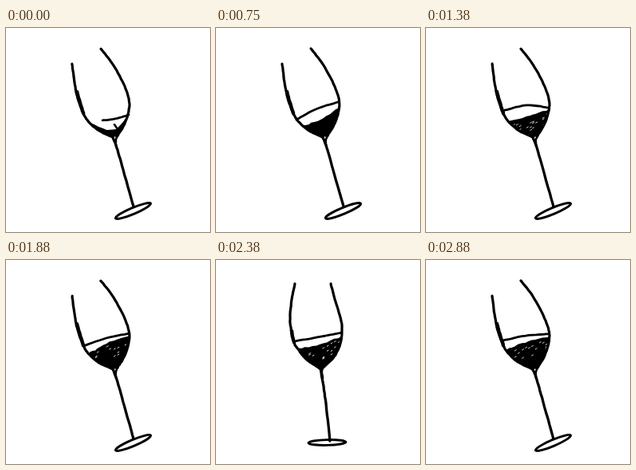
Recreate the animation shown at these times as an HTML page with a canvas. Size 256x256 px, loop 3 s.

```html
<!DOCTYPE html>
<html lang="en">
<head>
<meta charset="utf-8">
<title>Wine glass</title>
<style>
html, body { margin: 0; width: 100%; height: 100%; overflow: hidden; background: #fff; }
canvas { display: block; width: 256px; height: 256px; }
</style>
</head>
<body>
<canvas id="stage" width="256" height="256"></canvas>
<script>
const ctx = document.getElementById('stage').getContext('2d');
const LOOP = 3000;

// Flat lists of x, y pairs; both poses have the same number of points.
const TILTED = {
  left: [83, 45, 86, 68, 90, 88, 98, 109, 105, 119, 117, 129, 134, 137],
  right: [119, 26, 133, 44, 146, 67, 154, 88, 154, 104, 148, 122, 139, 136],
  stem: [134, 137, 139, 150, 147, 178, 160, 224],
  neck: [141, 134, 138, 140, 138, 148],
  shade: [89, 80, 92, 91, 97, 107],
  base: [159.5, 229.5, 24, 3.9, -0.4]
};
const UPRIGHT = {
  left: [99, 30, 95, 50, 93, 77, 98, 103, 103, 112, 114, 125, 130, 136],
  right: [144, 30, 150, 52, 157, 76, 158, 92, 155, 108, 147, 123, 133, 136],
  stem: [131, 136, 134, 153, 138, 181, 143, 227],
  neck: [135, 134, 133, 140, 134, 148],
  shade: [95, 89, 96, 96, 98, 103],
  base: [139.5, 229, 23.5, 3.4, -0.03]
};

// Surface line and top edge of the wine at chosen steps.
const WINE = [
  { at: 0, rim: [121, 116, 137, 114, 154, 109], top: [107, 120, 134, 128, 155, 109] },
  { at: 4, rim: [108, 117, 130, 107, 153, 95], top: [110, 121, 131, 115, 155, 102] },
  { at: 6, rim: [101, 115, 125, 102, 153, 93], top: [108, 123, 131, 115, 155, 99] },
  { at: 11, rim: [96, 104, 126, 97, 153, 100], top: [103, 117, 130, 110, 156, 102] },
  { at: 15, rim: [97, 108, 126, 98, 155, 92], top: [104, 117, 126, 105, 156, 95] },
  { at: 19, rim: [98, 102, 127, 97, 158, 91], top: [102, 111, 130, 106, 159, 95] },
  { at: 23, rim: [97, 101, 125, 95, 153, 93], top: [102, 112, 129, 102, 156, 96] }
];

const mix = (a, b, k) => a.map((v, i) => v + (b[i] - v) * k);

function randomFrom(seed) {
  let s = seed * 7919 + 17;
  return () => {
    s = (s * 16807) % 2147483647;
    return s / 2147483647;
  };
}

// Samples a smooth curve through the points, with a slight hand wobble.
function curve(pts, rnd, wobble = 0.4) {
  const n = pts.length / 2;
  const at = i => {
    const j = 2 * Math.max(0, Math.min(n - 1, i));
    return [pts[j], pts[j + 1]];
  };
  const out = [];
  for (let i = 0; i < n - 1; i++) {
    const [a, b, c, d] = [at(i - 1), at(i), at(i + 1), at(i + 2)];
    const last = i === n - 2 ? 1 : 0;
    for (let s = 0; s < 7 + last; s++) {
      const t = s / 7;
      out.push([0, 1].map(k =>
        b[k] + 0.5 * t * (c[k] - a[k] + t * (2 * a[k] - 5 * b[k] + 4 * c[k] - d[k]
        + t * (3 * (b[k] - c[k]) + d[k] - a[k]))) + (rnd() - 0.5) * wobble));
    }
  }
  return out;
}

function trace(points) {
  ctx.beginPath();
  points.forEach(p => ctx.lineTo(p[0], p[1]));
}

function stroke(points, width) {
  trace(points);
  ctx.lineWidth = width;
  ctx.stroke();
}

function wineAt(step) {
  const i = Math.max(1, WINE.findIndex(w => w.at >= step));
  const a = WINE[i - 1], b = WINE[i];
  const k = (step - a.at) / (b.at - a.at);
  return { rim: mix(a.rim, b.rim, k), top: mix(a.top, b.top, k) };
}

function drawWine(step, left, right, rnd) {
  const { rim, top } = wineAt(step);
  const edge = curve(top, rnd, 1.6);
  ctx.save();
  trace([...left, ...right.slice().reverse()]);
  ctx.clip();
  trace([[top[0] - 8, top[1] + 3], ...edge, [170, top[5]], [165, 140], [100, 140]]);
  ctx.fill();
  if (step > 6) {
    ctx.strokeStyle = '#fff';
    for (let i = 0; i < 16; i++) {
      const p = edge[2 + Math.floor(rnd() * (edge.length - 4))];
      const y = p[1] + 3 + rnd() * 18;
      stroke([[p[0], y], [p[0] + 2, y - 1.2]], 0.8);
    }
    ctx.strokeStyle = '#000';
  }
  ctx.restore();
  stroke(curve(rim, rnd), 2.8);
  if (step === 0) stroke([[136, 121], [140, 127]], 2.5);
}

function draw(step) {
  const rnd = randomFrom(step + 1);
  const swing = Math.max(0, Math.cos((step - 19) * Math.PI / 6));
  const lean = step > 15 && step < 23 ? swing * swing : 0;
  const part = name => mix(TILTED[name], UPRIGHT[name], lean);

  ctx.fillStyle = '#fff';
  ctx.fillRect(0, 0, 256, 256);
  ctx.fillStyle = ctx.strokeStyle = '#000';
  ctx.lineCap = ctx.lineJoin = 'round';

  const left = curve(part('left'), rnd);
  const right = curve(part('right'), rnd);
  drawWine(step, left, right, rnd);
  stroke(left, 3.2);
  stroke(right, 3.2);
  stroke(curve(part('shade'), rnd), 4.4);
  stroke(curve(part('stem'), rnd), 3.3);
  stroke(curve(part('neck'), rnd), 2.6);

  const [x, y, rx, ry, turn] = part('base');
  ctx.beginPath();
  ctx.ellipse(x, y, rx, ry, turn + (rnd() - 0.5) * 0.02, 0, 2 * Math.PI);
  ctx.lineWidth = 2.9;
  ctx.stroke();
}

function tick() {
  const t = performance.now() % LOOP;
  draw(2 * Math.floor(t / 250) + (t % 250 >= 130 ? 1 : 0));
  requestAnimationFrame(tick);
}
tick();
</script>
</body>
</html>
```
